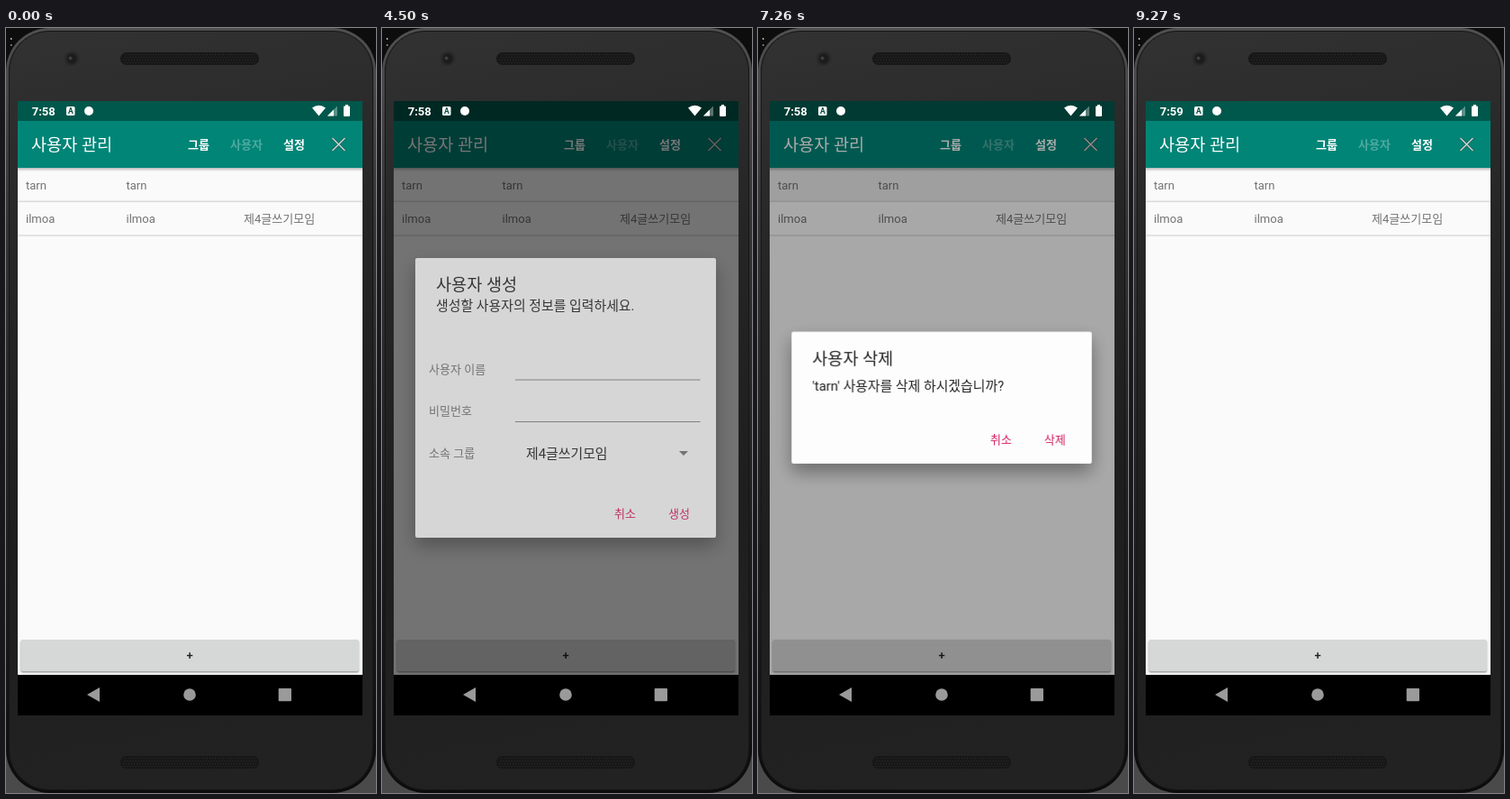
Write an HTML page with a canvas that moves like this. It is 411x848 px and loops after 9720 ms.

```html
<!DOCTYPE html>
<html lang="ko">
<head>
<meta charset="utf-8">
<title>사용자 관리</title>
<style>
html, body { margin: 0; width: 100%; height: 100%; overflow: hidden; background: #0d0d0d; }
canvas { display: block; width: 411px; height: 848px; }
</style>
</head>
<body>
<canvas id="stage"></canvas>
<script>
const W = 411, H = 848, LOOP = 9720, STEP = 30;
const FONT = 'Roboto, "Noto Sans CJK KR", "Noto Sans CJK", sans-serif';
const SMALL = 13.05, BODY = 14.9, TITLE = 18.6;
const INK = '#212121', GREY = '#737373', ACCENT = '#d81b60';
const USERS = ['tarn', 'ilmoa'], GROUP = '제4글쓰기모임';

const ratio = window.devicePixelRatio || 1;
function prepare(canvas) {
  canvas.width = Math.round(W * ratio);
  canvas.height = Math.round(H * ratio);
  const c = canvas.getContext('2d');
  c.scale(ratio, ratio);
  return c;
}
const screen = prepare(document.getElementById('stage'));
const shell = document.createElement('canvas');
const layer = document.createElement('canvas');
const shellCtx = prepare(shell), layerCtx = prepare(layer);
let g = screen;

const clamp = v => Math.max(0, Math.min(1, v));

function rect(x, y, w, h, color) {
  g.fillStyle = color;
  g.fillRect(x, y, w, h);
}
function roundPath(x, y, w, h, r) {
  g.beginPath();
  g.roundRect(x, y, w, h, r);
}
function round(x, y, w, h, r, color) {
  roundPath(x, y, w, h, r);
  g.fillStyle = color;
  g.fill();
}
function circle(x, y, r, color) {
  g.beginPath();
  g.arc(x, y, r, 0, 7);
  g.fillStyle = color;
  g.fill();
}
function poly(color, ...pts) {
  g.beginPath();
  for (let i = 0; i < pts.length; i += 2) g.lineTo(pts[i], pts[i + 1]);
  g.closePath();
  g.fillStyle = color;
  g.fill();
}
function text(s, x, y, size, color, weight = 400) {
  g.font = `${weight} ${size}px ${FONT}`;
  g.fillStyle = color;
  g.fillText(s, x, y);
}
function shade(x0, y0, x1, y1, ...colors) {
  const s = g.createLinearGradient(x0, y0, x1, y1);
  colors.forEach((c, i) => s.addColorStop(i / (colors.length - 1), c));
  return s;
}
function shadow(color, blur, dy) {
  g.shadowColor = color;
  g.shadowBlur = blur * ratio;
  g.shadowOffsetY = dy * ratio;
}

function grille(y) {
  round(127, y, 154, 14, 7, '#171717');
  g.save();
  roundPath(129, y + 1, 150, 12, 6);
  g.clip();
  for (let row = 0; row < 4; row++)
    for (let x = 130 + row % 2 * 1.5; x < 280; x += 3)
      rect(x, y + 2 + row * 3, 1.2, 1.2, '#2c2c2c');
  g.restore();
}

function drawShell() {
  g = shellCtx;
  rect(0, 0, W, H, '#0d0d0d');
  rect(0, H / 2, W, H / 2, '#4a4a4a');
  rect(5, 11, 1.5, 2, '#b9b49a');
  rect(5, 18, 1.5, 2, '#8a8a8a');
  round(0, 0, W, H, 48, shade(0, 0, 0, H, '#505050', '#343434', '#262626', '#1a1a1a', '#0c0c0c'));
  round(3, 3, W - 6, H - 6, 45, '#161616');
  round(4, 4, W - 8, H - 8, 44, shade(0, 0, 150, H, '#323232', '#252525', '#1e1e1e', '#222222'));
  grille(27);
  grille(807);
  circle(73, 34, 8, '#282828');
  circle(73, 34, 5.5, '#1c1c1c');
  circle(71.5, 33.5, 2, '#3c3d40');
}

function drawStatus(t) {
  text(t < 9150 ? '7:58' : '7:59', 28.7, 97, SMALL, '#fff', 700);
  round(67, 87, 9.5, 10, 1.5, '#fff');
  text('A', 69, 95.2, 8.5, '#00473d', 700);
  circle(92, 92, 5, '#fff');
  g.beginPath();
  g.moveTo(347.5, 97.5);
  g.lineTo(340, 88.5);
  g.quadraticCurveTo(347.5, 83, 355, 88.5);
  g.closePath();
  g.fillStyle = '#fff';
  g.fill();
  poly('rgba(255,255,255,.35)', 357, 97.5, 368, 97.5, 368, 86.5);
  poly('#fff', 357, 97.5, 364, 97.5, 364, 90.5);
  round(375, 86.5, 7, 11.5, 1, '#fff');
  rect(377, 85, 3, 2, '#fff');
}

function cross() {
  for (const [color, width] of [['#2b625b', 3], ['#cbd8d5', 1.4]]) {
    g.strokeStyle = color;
    g.lineWidth = width;
    g.beginPath();
    g.moveTo(362.5, 122);
    g.lineTo(376.5, 136);
    g.moveTo(376.5, 122);
    g.lineTo(362.5, 136);
    g.stroke();
  }
}

// Touch ripple growing from the middle, then fading out.
function ripple(t, start, grow, fade, x, y, w, h, radius) {
  if (t < start || t > fade + 180) return;
  const left = 1 - clamp((t - start) / grow);
  const alpha = .11 * (1 - clamp((t - fade) / 180));
  g.save();
  roundPath(x, y, w, h, 2);
  g.clip();
  circle(x + w / 2, y + h / 2, radius * (1 - .31 * left * left), `rgba(0,0,0,${alpha})`);
  g.restore();
}

function drawApp(t) {
  rect(13, 81, 383, 636, '#fafafa');
  ripple(t, 6660, 120, 7170, 13, 155, 383, 37, 193);
  USERS.forEach((name, i) => {
    const y = 178.5 + i * 37.7;
    text(name, 22, y, SMALL, GREY);
    text(name, 133.5, y, SMALL, GREY);
    rect(13, 191.5 + i * 37.7, 383, 1.6, '#dcdcdc');
  });
  text(GROUP, 264, 216, SMALL, GREY);

  rect(13, 155, 383, 4, shade(0, 155, 0, 159, 'rgba(0,0,0,.26)', 'rgba(0,0,0,0)'));
  rect(13, 81, 383, 22, '#00574b');
  rect(13, 103, 383, 52, '#008577');
  text('사용자 관리', 28, 136, TITLE, '#fff');
  text('그룹', 202, 133.5, SMALL, '#fff', 700);
  text('사용자', 249, 133.5, SMALL, 'rgba(255,255,255,.3)', 700);
  text('설정', 308, 133.5, SMALL, '#fff', 700);
  cross();

  g.save();
  shadow('rgba(0,0,0,.4)', 2, 1.5);
  round(16.5, 678, 375.5, 35, 2, '#d6d7d7');
  g.restore();
  ripple(t, 1080, 90, 1530, 16.5, 678, 375.5, 35, 190);
  text('+', 200.5, 699.5, SMALL, INK, 500);
}

function drawNav() {
  rect(13, 717, 383, 45, '#000');
  poly('#9a9a9a', 90, 739, 104, 731, 104, 747);
  circle(204, 739, 6.8, '#9a9a9a');
  round(302.7, 732, 14.3, 14.3, 1, '#9a9a9a');
}

function panel(y, h, color, title, confirm) {
  g.save();
  shadow('rgba(0,0,0,.38)', 20, 9);
  round(37, y, 334, h, 2, color);
  g.restore();
  text(title, 60, y + 36, TITLE, INK);
  text('취소', 258, y + h - 21.7, SMALL, ACCENT, 500);
  text(confirm, 318, y + h - 21.7, SMALL, ACCENT, 500);
}

function createDialog() {
  panel(255, 310, '#fafafa', '사용자 생성', '생성');
  text('생성할 사용자의 정보를 입력하세요.', 60, 313, BODY, INK);
  ['사용자 이름', '비밀번호', '소속 그룹'].forEach((s, i) =>
    text(s, 52, 382.5 + i * 46.8, SMALL, GREY));
  rect(148, 389.5, 205.5, 1, '#868686');
  rect(148, 436, 205.5, 1, '#868686');
  text(GROUP, 160, 476.5, BODY, INK);
  poly('#737373', 330, 469, 340, 469, 335, 474);
}

function deleteDialog() {
  panel(336.5, 146.5, '#fff', '사용자 삭제', '삭제');
  text(`'${USERS[0]}' 사용자를 삭제 하시겠습니까?`, 60, 402, BODY, INK);
}

const dialogs = [
  { open: 1510, close: 4500, end: 4650, draw: createDialog },
  { open: 7150, close: 9150, end: 9270, draw: deleteDialog }
];

function drawDialog(t, { open, close, end, draw }) {
  const closing = t >= close;
  const p = clamp((t - open) / 200);
  const dim = .6 * (closing ? clamp((end - t) / 168) : p);
  const alpha = closing ? clamp((end - 65 - t) / 115) : 1 - (1 - clamp((t - open) / 150)) ** 3;
  const scale = closing ? 1 : 1 - .1 * (1 - p) ** 5;
  rect(13, 81, 383, 636, `rgba(0,0,0,${dim})`);

  g = layerCtx;
  g.clearRect(0, 0, W, H);
  draw();
  g = screen;
  g.save();
  g.beginPath();
  g.rect(13, 81, 383, 636);
  g.clip();
  g.globalAlpha = alpha;
  g.translate(204, 410);
  g.scale(scale, scale);
  g.drawImage(layer, -204, -410, W, H);
  g.restore();
}

function render(now) {
  let t = now % LOOP;
  t -= t % STEP;
  g = screen;
  g.drawImage(shell, 0, 0, W, H);
  drawApp(t);
  for (const d of dialogs) if (t > d.open && t < d.end) drawDialog(t, d);
  drawStatus(t);
  drawNav();
}

drawShell();
const begin = performance.now();
function tick() {
  render(performance.now() - begin);
  requestAnimationFrame(tick);
}
tick();
</script>
</body>
</html>
```
